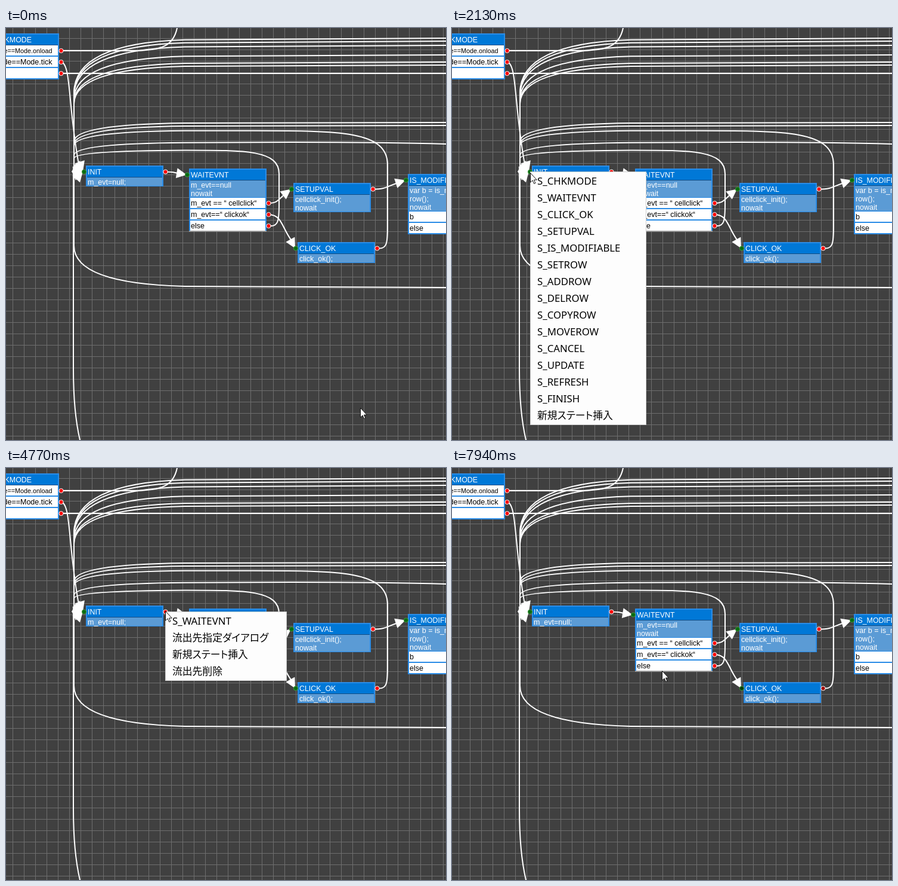
An HTML page with a canvas for the animation above (8 s loop, 738 by 689 pixels).

```html
<!DOCTYPE html>
<html lang="ja">
<head>
<meta charset="utf-8">
<style>
html, body { margin: 0; width: 100%; height: 100%; overflow: hidden; background: #404040; }
canvas, #menu, #pointer { position: absolute; left: 0; top: 0; }
#menu {
  box-sizing: border-box; padding: 1px 0 0 11px; background: #fdfdfd; border: 1px solid #ccc;
  font: 16.8px/28px "Noto Sans", "Noto Sans CJK JP", sans-serif; color: #000;
  font-feature-settings: "palt"; white-space: nowrap; overflow: hidden;
}
#pointer { overflow: visible; }
</style>
</head>
<body>
<canvas id="stage" width="738" height="689"></canvas>
<div id="menu"></div>
<svg id="pointer" width="14" height="20">
  <path d="M.5 .5V16.2L4.1 12.8L6.6 18.4L8.9 17.4L6.5 12H11.3Z" fill="#fff" stroke="#111" stroke-width="1"/>
</svg>
<script>
const W = 738, H = 689, LOOP = 8000;
const TRUNK = 114, BEND = 300;
const stage = document.getElementById('stage');
const menuBox = document.getElementById('menu');
const pointer = document.getElementById('pointer');
const ctx = stage.getContext('2d');

// ---------- nodes and ports ----------
const node = (x, y, title, body = [], rows = []) => {
  const rowTop = y + 20 + (body.length ? body.length * 14 + 1 : 0);
  const right = x + 133.5;
  return {
    x, y, title, body, rows, rowTop,
    bottom: rowTop + rows.length * 19,
    input: [x - 3, y + 10.5],
    outputs: rows.length ? rows.map((_, i) => [right, rowTop + 9 + i * 19]) : [[right, y + 10.5]]
  };
};

const mode = node(-41, 9, 'CHKMODE', [], ['mode==Mode.onload', 'mode==Mode.tick', '']);
const init = node(134, 230, 'INIT', ['m_evt=null;']);
const wait = node(307, 235, 'WAITEVNT', ['m_evt==null', 'nowait'],
  ['m_evt == “ cellclick“', 'm_evt==“ clickok“', 'else']);
const setup = node(482, 259, 'SETUPVAL', ['cellclick_init();', 'nowait']);
const ok = node(489, 358, 'CLICK_OK', ['click_ok();']);
const modif = node(674, 244, 'IS_MODIFIABLE', ['var b = is_mod_', 'row();', 'nowait'], ['b', 'else']);
const nodes = [mode, init, wait, setup, ok, modif];

const dots = nodes.flatMap(n => [
  { at: n.input, fill: '#0a6a12', dim: '#083c0c', edge: '#3f9a3a' },
  ...n.outputs.map(at => ({ at, fill: '#f00', dim: '#a00000', edge: '#fff' }))
]);

// ---------- links ----------
const rad = Math.PI / 180;

function strokePath(d) {
  ctx.strokeStyle = '#fff';
  ctx.lineWidth = 2;
  ctx.stroke(new Path2D(d));
}

function drawHead([x, y], angle) {
  ctx.save();
  ctx.translate(x, y);
  ctx.rotate(angle);
  ctx.beginPath();
  ctx.moveTo(0, 0);
  ctx.lineTo(-17, -8.5);
  ctx.lineTo(-17, 8.5);
  ctx.fillStyle = '#fff';
  ctx.fill();
  ctx.restore();
}

function connect([x0, y0], [x1, y1]) {
  const angle = 1.2 * Math.atan2(y1 - y0, x1 - x0);
  const bx = x1 - 15 * Math.cos(angle), by = y1 - 15 * Math.sin(angle);
  const mid = (x0 + bx) / 2 + 3;
  strokePath(`M${x0} ${y0}C${mid} ${y0} ${mid} ${(y0 + by) / 2} ${bx} ${by}`);
  drawHead([x1 - 1, y1], angle);
}

// bend from the level run into the trunk, ending beside INIT
const bend = (y, drop) =>
  `L${BEND} ${y + drop * .03}C180 ${y + drop * .07} ${TRUNK} ${y + drop * .38} ${TRUNK} ${y + drop}V240`;

// climb from an output, turn left at height y and join the trunk
function loopBack([x0, y0], x, y, drop, round) {
  const top = y + drop * .03;
  strokePath(`M${x0} ${y0}h4C${x - 2} ${y0} ${x} ${y0 - 8} ${x} ${y0 - 36}V${y + round}` +
    `C${x} ${y} ${x - round * 1.4} ${top} ${Math.max(BEND, x - round * 4)} ${top}` + bend(y, drop));
}

function drawLinks() {
  for (const y of [17, 22, 29, 45, 57, 62]) strokePath(`M${W} ${y}` + bend(y, 92 - .6 * (y - 17)));
  for (const y of [158, 163]) strokePath(`M${W} ${y}` + bend(y, 32));
  strokePath(`M${W} 194Q640 191 480 191` + bend(191, 22));
  strokePath(`M${W} 434` + bend(434, -70));
  strokePath(`M124 ${H}C116 655 113 620 113 570V240`);
  strokePath('M93 38H205C265 39 281 28 287 0');
  strokePath('M93 57C109 61 104 130 122 228');
  strokePath(`M93 76H${W}`);
  loopBack(wait.outputs[2], 458, 204, 14, 40);
  loopBack(ok.outputs[0], 640, 171, 26, 58);

  connect(init.outputs[0], wait.input);
  connect(wait.outputs[0], setup.input);
  connect(wait.outputs[1], ok.input);
  connect(setup.outputs[0], modif.input);
  for (let a = 72; a >= -50; a -= 24) drawHead([129, 240], a * rad);
}

// ---------- still picture ----------
function rect(x, y, w, h, color) {
  ctx.fillStyle = color;
  ctx.fillRect(x, y, w, h);
}

function text(s, x, y, size, color, align = 'left') {
  ctx.font = size + 'px "Liberation Sans", Arial, sans-serif';
  ctx.fillStyle = color;
  ctx.textAlign = align;
  ctx.fillText(s, x, y);
}

function drawGrid() {
  rect(0, 0, W, H, '#404040');
  for (let x = 11; x < W; x += 19) rect(x, 0, 1, H, '#6e6e6e');
  for (let y = 17; y < H; y += 19) rect(0, y, W, 1, '#6e6e6e');
}

function drawNode(n) {
  const inner = n.x + 2, w = 126;
  rect(n.x, n.y, w + 4, n.bottom - n.y, '#2b8ce6');
  rect(inner, n.y + 2, w, 17, '#0078d7');
  rect(inner, n.y + 19, w, 1, '#114d85');
  if (n.body.length) rect(inner, n.y + 20, w, n.rowTop - n.y - 21, '#5b9bd5');
  const cut = n === mode;
  text(n.title, cut ? 43 : n.x + 3, n.y + 14.5, 12.4, '#fff', cut ? 'right' : 'left');
  n.body.forEach((s, i) => text(s, n.x + 3, n.y + 32 + i * 14, 12.5, '#fff'));
  n.rows.forEach((s, i) => {
    const y = n.rowTop + i * 19;
    rect(inner, y, w, 17, '#fff');
    if (cut) text(s, 77.5, y + 13, i ? 12.5 : 10.8, '#000', 'right');
    else text(s, n.x + 3, y + 13, 12.5, '#000');
  });
  if (n === wait) rect(n.x, n.bottom - 2, w + 4, 2, '#999');
}

const base = document.createElement('canvas');
function paintBase() {
  drawGrid();
  drawLinks();
  nodes.forEach(drawNode);
  base.width = W;
  base.height = H;
  base.getContext('2d').drawImage(stage, 0, 0);
}

// ---------- menus ----------
const actions = ['流出先指定ダイアログ', '新規ステート挿入', '流出先削除'];
const sources = 'CHKMODE WAITEVNT CLICK_OK SETUPVAL IS_MODIFIABLE SETROW ADDROW DELROW COPYROW MOVEROW CANCEL UPDATE REFRESH FINISH'
  .split(' ').map(s => 'S_' + s);
const menus = [
  { press: 1490, open: 2130, shut: 2690, x: 131, y: 240, w: 195, items: [...sources, actions[1]] },
  { press: 4220, open: 4770, shut: 5190, x: 267, y: 240, w: 204, items: ['S_WAITEVNT', ...actions] },
  { press: 6430, open: 7170, shut: 7620, x: 440, y: 293, w: 204, items: ['S_SETUPVAL', ...actions] }
];
for (const m of menus) m.h = m.items.length * 28 + 4;
let shown = null;

function showMenu(t) {
  const m = menus.find(m => t >= m.open && t < m.shut);
  if (m === shown) return;
  shown = m;
  menuBox.style.display = m ? 'block' : 'none';
  if (!m) return;
  Object.assign(menuBox.style, { left: m.x + 'px', top: m.y + 'px', width: m.w + 'px', height: m.h + 'px' });
  menuBox.replaceChildren(...m.items.map(s => {
    const row = document.createElement('div');
    row.textContent = s;
    return row;
  }));
}

// a dot stays dim for a moment after a menu above it closes
const isDim = ([x, y], t) => menus.some(m =>
  t >= m.shut && t < m.shut + 900 &&
  x > m.x + 2 && x < m.x + m.w && y > m.y && y < m.y + m.h);

function circle(x, y, r) {
  ctx.beginPath();
  ctx.arc(x, y, r, 0, 7);
}

function drawDot(d, t) {
  circle(...d.at, 3.6);
  ctx.fillStyle = isDim(d.at, t) ? d.dim : d.fill;
  ctx.fill();
  ctx.lineWidth = 1;
  ctx.strokeStyle = d.edge;
  ctx.stroke();
}

function drawPress(m, t) {
  if (t < m.press || t >= m.press + 95) return;
  circle(m.x - .5, m.y + .5, 11);
  ctx.lineWidth = 1.5;
  ctx.strokeStyle = 'rgba(255,255,255,.6)';
  ctx.stroke();
}

// ---------- pointer ----------
// time, x, y
const stops = [
  [0, 594, 635], [735, 123, 233], [840, 129, 239], [940, 129, 239], [1270, 131, 242],
  [2460, 131, 242], [2690, 203, 118], [3000, 316, 170], [3360, 256, 229], [3790, 267, 239],
  [4975, 267, 239], [5190, 400, 70], [5550, 486, 190], [5860, 437, 283], [5980, 439, 291],
  [7400, 439, 291], [7620, 89, 315], [7940, 352, 339]
];
const ease = u => u * u * (3 - 2 * u);

// the pointer is sampled about every 107 ms
function pointerAt(t) {
  const i = stops.findLastIndex(s => s[0] <= t);
  const [ta, xa, ya] = stops[i];
  if (i === stops.length - 1) return [xa, ya];
  const [tb, xb, yb] = stops[i + 1];
  const n = Math.max(1, Math.round((tb - ta) / 107));
  const u = ease(Math.floor((t - ta) / (tb - ta) * n + 1e-6) / n);
  return [Math.round(xa + (xb - xa) * u), Math.round(ya + (yb - ya) * u)];
}

function render(now) {
  const t = now % LOOP;
  ctx.drawImage(base, 0, 0);
  dots.forEach(d => drawDot(d, t));
  menus.forEach(m => drawPress(m, t));
  showMenu(t);
  const [x, y] = pointerAt(t);
  pointer.style.transform = `translate(${x}px, ${y}px)`;
}

paintBase();
menuBox.style.display = 'none';
const start = performance.now();
function tick() {
  render(Math.max(0, performance.now() - start));
  requestAnimationFrame(tick);
}
render(0);
requestAnimationFrame(tick);
</script>
</body>
</html>
```
